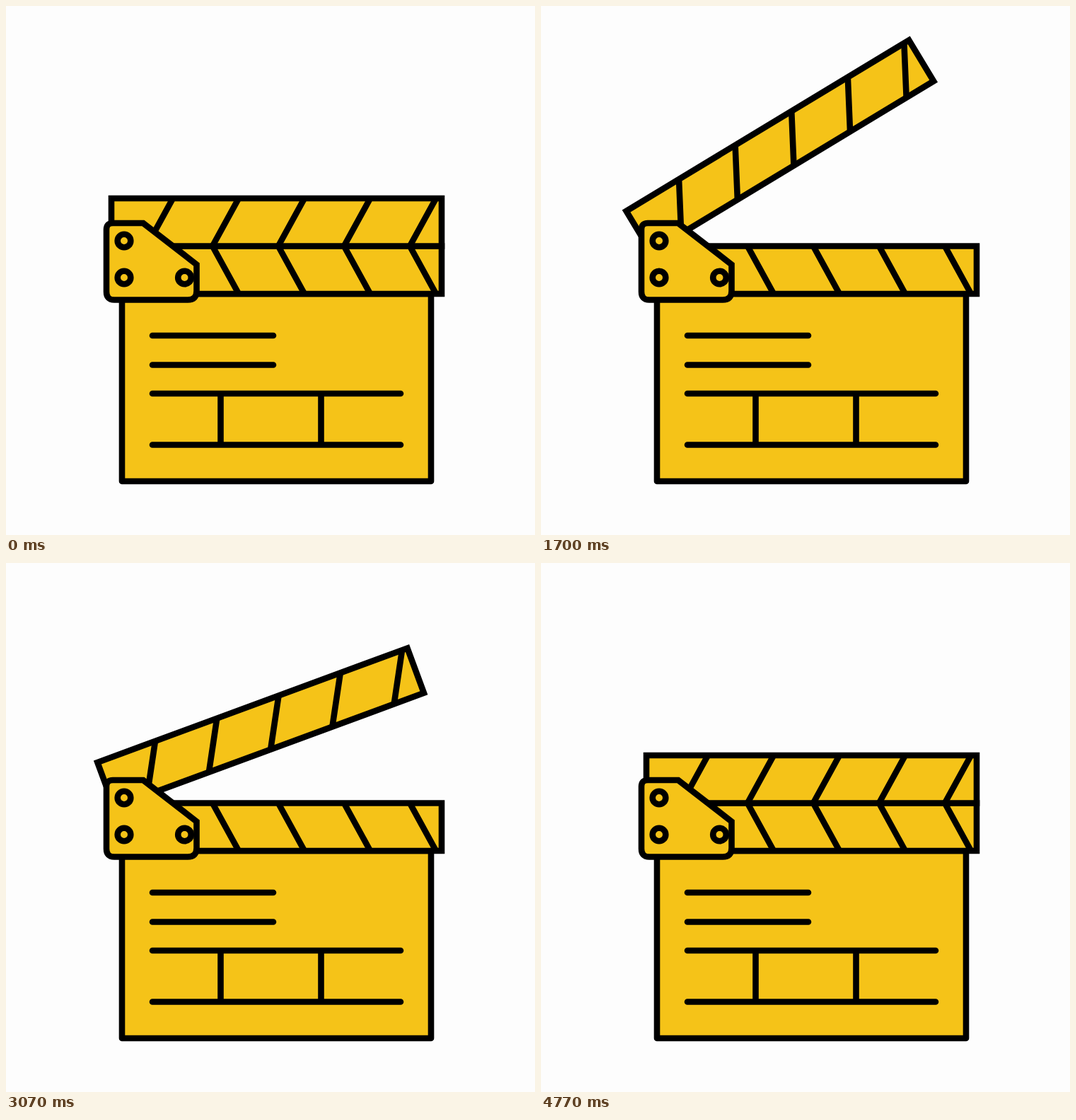
An HTML page that plays this animation: 748 by 748 pixels, repeating every 4810 ms.

```html
<!DOCTYPE html>
<html>
<head>
<meta charset="utf-8">
<title>Clapperboard</title>
<style>
  html, body { margin: 0; height: 100%; overflow: hidden; background: #fdfdfd; }
  svg { display: block; width: 100vw; height: 100vh; }
  .ink { fill: #f5c318; stroke: #000; stroke-width: 8.6; }
  .round { stroke-linecap: round; stroke-linejoin: round; }
</style>
</head>
<body>
<svg viewBox="0 0 748 748" class="ink">
  <path class="round" d="M164 407H601V672H164Z"/>
  <path class="round" d="M207 466H378M207 507.5H378M207 548H558M207 620.5H558"/>
  <path d="M303.5 548V620M445.5 548V620"/>
  <g>
    <path d="M149 339.5H616V407H149Z"/>
    <path d="M292 339.5l37 67.5M385 339.5l37 67.5M478 339.5l37 67.5M571 339.5l37 67.5"/>
  </g>
  <g id="arm">
    <path d="M149 272H616V339.5H149Z"/>
    <path d="M236 272l-37 67.5M329 272l-37 67.5M422 272l-37 67.5M515 272l-37 67.5M608 272l-37 67.5"/>
  </g>
  <path d="M151 307H194L269.5 365.5V403Q269.5 415.5 257 415.5H153Q142 415.5 142 404V316Q142 307 151 307Z"/>
  <circle cx="167" cy="332" r="9.3"/>
  <circle cx="167" cy="384" r="9.3"/>
  <circle cx="252.5" cy="384" r="9.3"/>
</svg>
<script>
const LOOP = 4810, SECOND_CLAP = 2470, MAX_ANGLE = 31.5;
const arm = document.getElementById('arm');

// Ease equal to cubic-bezier(.6, 0, .4, 1), solved by bisection
function ease(x) {
  if (x <= 0) return 0;
  if (x >= 1) return 1;
  let lo = 0, hi = 1;
  for (let i = 0; i < 24; i++) {
    const u = (lo + hi) / 2, v = 1 - u;
    if (1.8 * u * v * v + 1.2 * u * u * v + u ** 3 < x) lo = u; else hi = u;
  }
  return lo * lo * (3 - 2 * lo);
}

// Slow opening, a hold, then a quick snap shut
function angleAt(ms) {
  const t = ms < SECOND_CLAP ? ms : ms - SECOND_CLAP;
  return MAX_ANGLE * (ease((t - 42) / 1000) - ease((t - 1675) / 250));
}

const start = performance.now();
function draw() {
  const angle = angleAt((performance.now() - start) % LOOP);
  arm.setAttribute('transform', `rotate(${-angle} 167 332)`);
  requestAnimationFrame(draw);
}
draw();
</script>
</body>
</html>
```
